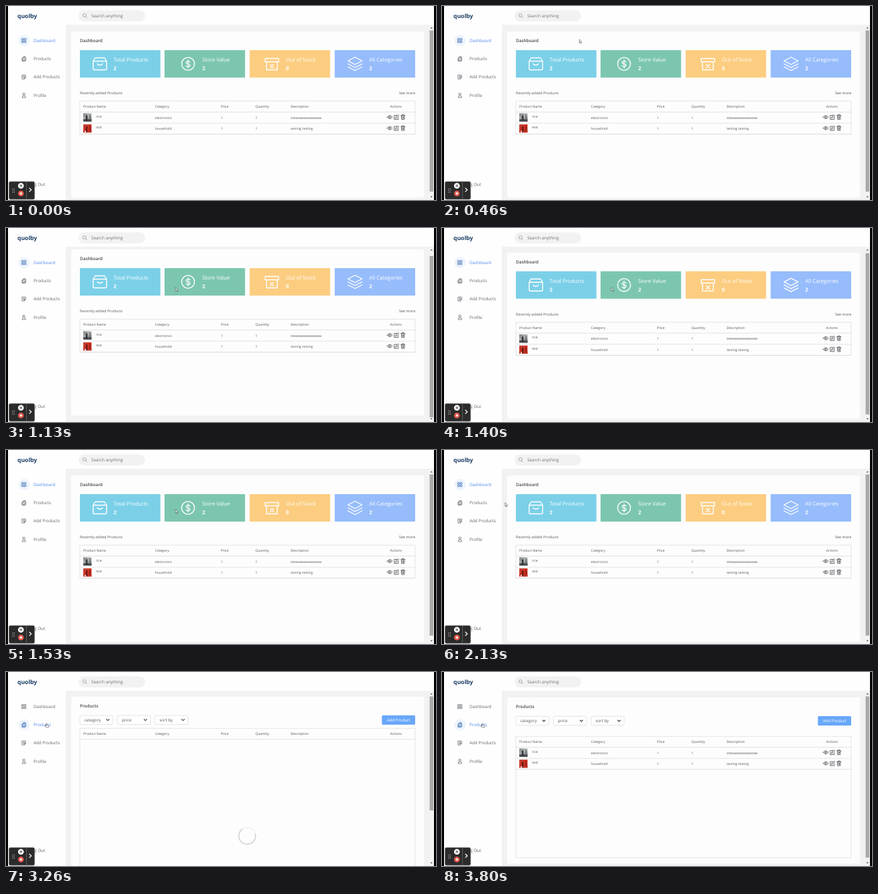
Recreate the animation shown at these times as an HTML page with a canvas. Size 640 px wide and 290 px high, loop 3.86 s.

```html
<!DOCTYPE html>
<html lang="en">
<head>
<meta charset="utf-8">
<title>Inventory dashboard</title>
<style>
  html, body { margin: 0; width: 100%; height: 100%; overflow: hidden; background: #000; }
  canvas { display: block; width: 640px; height: 290px; }
</style>
</head>
<body>
<canvas id="stage"></canvas>
<script>
const W = 640, H = 290, LOOP = 3860, STEP = 200 / 3;
const PAGE_SWITCH = 2730, LOADED = 3460;
const FONT = '"Open Sans", "Noto Sans", sans-serif';
const INK = '#555a60', BLUE = '#4c86ee', LINE = '#dcdddf';

const canvas = document.getElementById('stage');
const ctx = canvas.getContext('2d');
const dpr = window.devicePixelRatio || 1;
canvas.width = W * dpr;
canvas.height = H * dpr;

const clamp = v => Math.max(0, Math.min(1, v));
const ease = v => v * v * (3 - 2 * v);

// Interpolates [time, ...values] keys with eased segments.
function track(keys, t) {
  if (t <= keys[0][0]) return keys[0].slice(1);
  for (let i = 1; i < keys.length; i++) {
    const a = keys[i - 1], b = keys[i];
    if (t <= b[0]) {
      const p = ease(clamp((t - a[0]) / (b[0] - a[0])));
      return a.slice(1).map((v, j) => v + (b[j + 1] - v) * p);
    }
  }
  return keys[keys.length - 1].slice(1);
}

function text(str, x, y, size, color = INK, weight = 400) {
  ctx.font = `${weight} ${size}px ${FONT}`;
  ctx.textRendering = 'geometricPrecision';
  ctx.textBaseline = 'alphabetic';
  ctx.fillStyle = color;
  ctx.fillText(str, x, y + size * 0.33);
}

function rect(x, y, w, h, color) {
  ctx.fillStyle = color;
  ctx.fillRect(x, y, w, h);
}

function round(x, y, w, h, r, fill, stroke, lw = 1) {
  ctx.beginPath();
  ctx.roundRect(x, y, w, h, r);
  paint(fill, stroke, lw);
}

function circle(x, y, r, fill, stroke, lw = 1) {
  ctx.beginPath();
  ctx.arc(x, y, r, 0, Math.PI * 2);
  paint(fill, stroke, lw);
}

function paint(fill, stroke, lw) {
  if (fill) { ctx.fillStyle = fill; ctx.fill(); }
  if (stroke) { ctx.strokeStyle = stroke; ctx.lineWidth = lw; ctx.stroke(); }
}

function shape(x, y, d, fill, stroke, lw = 1) {
  ctx.save();
  ctx.translate(x, y);
  const path = new Path2D(d);
  ctx.lineCap = ctx.lineJoin = 'round';
  if (fill) { ctx.fillStyle = fill; ctx.fill(path); }
  if (stroke) { ctx.strokeStyle = stroke; ctx.lineWidth = lw; ctx.stroke(path); }
  ctx.restore();
}

const ICONS = {
  archive: 'M-7-9H7L10-4V7Q10 9 8 9H-8Q-10 9-10 7V-4ZM-10-4H10M-4 0Q0 4 4 0',
  soldOut: 'M-10-8H10V-3H-10ZM-8-3V9H8V-3M-2.5 1L2.5 6M2.5 1L-2.5 6',
  layers: 'M0-10L10.5-4.5 0 1-10.5-4.5ZM-10.5 0L0 5.5 10.5 0M-10.5 4.5L0 10 10.5 4.5',
  grid: 'M-3-3H-.7V-.7H-3ZM.7-3H3V-.7H.7ZM-3 .7H-.7V3H-3ZM.7 .7H3V3H.7Z',
  stack: 'M-1.5-2H2.8V3H-1.5ZM-1.5-1H-2.8V3.4H1.5M-.5-2V-3.3H1.8V-2M0 0H1.6M0 1.4H1.6',
  note: 'M-2.5-3H2.5V.5L.5 3H-2.5ZM-1.2-1.2H1.2M-1.2 .4H.6M.5 3V.6H2.5',
  user: 'M-1.6-1.6A1.6 1.6 0 1 1 1.6-1.6A1.6 1.6 0 1 1-1.6-1.6ZM-2.6 3.2Q-2.6 .6 0 .6T2.6 3.2Z',
  eye: 'M-3.8 0Q0-5 3.8 0Q0 5-3.8 0ZM-1.2 0A1.2 1.2 0 1 1 1.2 0A1.2 1.2 0 1 1-1.2 0Z',
  edit: 'M.6-2.6H-3.2V3.4H2.8V0M-1.2 1.4L-.8-.4 2.6-3.6 3.7-2.5 .4 .8Z',
  trash: 'M-3-2.4H3M-1.2-2.4V-3.6H1.2V-2.4M-2.4-2.4L-2 3.5H2L2.4-2.4M-.7-.8V2M.7-.8V2',
  chevron: 'M-2-1L0 1 2-1',
  arrow: 'M0 0V5L1.2 4 2 5.8 2.9 5.4 2.1 3.6H3.6Z',
  hand: 'M.2 0Q1.1-.5 1.3.5V2.4L3.6 2.9Q4.3 3.1 4.1 4L3.6 6H.6L-1.2 3.8Q-1-.0.2 3.6Z'
};

function header() {
  rect(3, 0, 634, 28, '#fefefe');
  text('quolby', 17, 14.8, 8.6, '#1d3f66', 700);
  round(108, 6.5, 99, 16.5, 8, '#f2f2f3');
  circle(116.8, 14, 2.4, null, '#8b8f94', 0.7);
  shape(118.6, 15.8, 'M0 0L1.8 1.8', null, '#8b8f94', 0.7);
  text('Search anything', 127, 15, 6.3, '#6c7075');
}

const MENU = [['Dashboard', 'grid'], ['Products', 'stack'], ['Add Products', 'note'], ['Profile', 'user']];

function sidebar(active) {
  rect(3, 28, 86, 262, '#fefefe');
  MENU.forEach(([label, icon], i) => {
    const y = 52 + i * 27.2, on = i === active;
    if (on) circle(27, y - 0.2, 8.5, '#edf4fd');
    shape(26.7, y - 0.3, ICONS[icon], null, on ? '#3f6fb4' : '#666b71', 0.8);
    text(label, 41, y, 6.3, on ? BLUE : '#5d6268');
  });
  text('Log Out', 35, 266.5, 6.3, '#5d6268');
}

function scrollbar(top, bottom) {
  rect(630, 28, 7, 262, '#f3f3f3');
  rect(630.5, top, 5.5, bottom - top, '#a9a9a9');
  shape(633.2, 32.5, 'M-1.8 1L0-1 1.8 1Z', '#555');
  shape(633.2, 285.5, 'M-1.8-1L0 1 1.8-1Z', '#555');
}

function dollar(x, y) {
  circle(x, y, 9.6, null, '#fff', 1.4);
  shape(x, y, 'M3-2.8Q2.4-4.2 0-4.2T-2.9-2.1Q-2.9-.4 0 0T2.9 2.1Q2.9 4.2 0 4.2T-3 2.8M0-6V6', null, '#fff', 1.2);
}

const CARDS = [
  ['Total Products', '2', '#7bd0e8', 'archive', 110, 139.7, 160],
  ['Store Value', '2', '#7cc6b0', null, 236, 271, 292],
  ['Out of Stock', '0', '#fccd80', 'soldOut', 362.6, 395.7, 416.6],
  ['All Categories', '2', '#96bcfb', 'layers', 489.2, 519.5, 540.5]
];

function card([label, count, color, icon, x, ix, tx]) {
  rect(x, 66, 119.8, 41, color);
  if (icon) shape(ix, 86.5, ICONS[icon], null, '#fff', 1.4);
  else dollar(ix, 86.5);
  text(label, tx, 80.8, 7.8, '#fff');
  text(count, tx, 93.3, 7.8, '#fff', 700);
}

function photo(x, y, red) {
  ctx.save();
  ctx.beginPath();
  ctx.rect(x, y, 12.3, 12.5);
  ctx.clip();
  const g = ctx.createLinearGradient(x, y, x + 12, y + 12);
  g.addColorStop(0, red ? '#b5483c' : '#777b7d');
  g.addColorStop(0.5, red ? '#d8301f' : '#b9bcbd');
  g.addColorStop(1, red ? '#a92a20' : '#55595b');
  rect(x, y, 13, 13, g);
  const dark = red ? '#6f1f1a' : '#34383a';
  rect(x, y + 9, 13, 4, red ? '#c53428' : '#4a4e50');
  circle(x + 5, y + 4.5, 1.5, dark);
  rect(x + 3.6, y + 5.6, 2.8, 6, dark);
  rect(x + 9, y + 2, 1.5, 8, red ? '#8a2119' : '#6d7173');
  if (red) rect(x + 2, y + 10, 2, 3, '#f1ddd6');
  ctx.restore();
}

const COLUMNS = [['Product Name', 115], ['Category', 221.7], ['Price', 319.7], ['Quantity', 371.3], ['Description', 423.6], ['Actions', 571.8]];
const ROWS = [['rice', 'electronics', '1', '1', 'stewwwwwwwwww'], ['test', 'household', '1', '1', 'testing testing']];

function tableHead(y) {
  COLUMNS.forEach(([label, x]) => text(label, x, y, 5.05, '#4e5257'));
}

function tableRows(top) {
  ROWS.forEach((row, i) => {
    const y = top + 16.5 + i * 16.5;
    photo(115, y + 1.7, i === 1);
    text(row[0], 134, y + 6.5, 5.1);
    for (let c = 1; c < 5; c++) text(row[c], COLUMNS[c][1], y + 8.6, 5.05);
    ['eye', 'edit', 'trash'].forEach((name, k) =>
      shape(571.2 + k * 9.8, y + 7.6, ICONS[name], null, '#474b50', 0.8));
    rect(110, y + 16.2, 499, 0.8, LINE);
  });
}

function table(top, height, filled) {
  round(109.9, top + 0.2, 499, height, 0, null, LINE, 0.8);
  tableHead(top + 8.5);
  rect(110, top + 16, 499, 0.8, LINE);
  if (filled) tableRows(top);
}

function panel(h) {
  round(97, 38, 525, h, 3, '#fdfdfd');
}

function dashboard() {
  panel(248.5);
  text('Dashboard', 110, 52.2, 6.4, '#3f4348', 600);
  CARDS.forEach(card);
  text('Recently added Products', 110, 130.5, 5.5);
  text('See more', 585, 130.5, 5.5);
  table(142, 49.5, true);
}

function spinner(x, y, t) {
  const a = (t - 3260) / 750 * Math.PI * 2 - 2.2;
  circle(x, y, 12.5, null, '#f0f0f0', 1.6);
  ctx.beginPath();
  ctx.arc(x, y, 12.5, a - 4.4, a);
  paint(null, '#d5d6d8', 1.6);
}

function products(t) {
  const loaded = t >= LOADED;
  panel(loaded ? 248.5 : 300);
  text('Products', 110, 52.3, 6.4, '#3f4348', 600);
  ['category', 'price', 'sort by'].forEach((label, i) => {
    const x = 110 + i * 56;
    round(x, 66.3, 49, 13.5, 2, '#fff', LINE, 0.8);
    text(label, x + 6.4, 73.3, 6.2);
    shape(x + 41.5, 73, ICONS.chevron, null, '#3f4348', 1.1);
  });
  round(559.5, 66, 49.5, 14, 1.5, '#68a7fa');
  text('Add Product', 567, 73, 6.05, '#fff');
  if (loaded) table(96, 181.5, true);
  else {
    table(85.3, 260, false);
    spinner(359, 246.3, t);
  }
}

function recorder() {
  round(4.5, 262.5, 38, 26.5, 2, '#2b2b2c', '#707173', 0.7);
  rect(30, 263, 0.8, 25.5, '#66676a');
  for (let i = 0; i < 6; i++) circle(9.9 + (i % 2) * 2.4, 273.4 + (i >> 1) * 2.5, 0.65, '#b5b5b5');
  circle(22.2, 268.7, 4.3, '#fff');
  rect(20.7, 266.9, 1, 3.6, '#333');
  rect(22.7, 266.9, 1, 3.6, '#333');
  circle(22.2, 280.2, 4.3, '#e2574a');
  rect(20.7, 278.7, 3, 3, '#fff');
  shape(36.3, 274.8, 'M-1.4-2.6L1.4 0-1.4 2.6', null, '#fff', 1.2);
}

const POINTER = [[200, 188, 22], [460, 204.3, 50.2], [800, 252.2, 89.3], [1600, 252.2, 89.3], [2330, 59.5, 77]];
const SCROLL = [[860, 0], [1060, 6], [1260, 6], [1460, 0]];

function pointer(t) {
  if (t < 200) return;
  const [x, y] = track(POINTER, t);
  const hand = x < 72;
  shape(x, y, hand ? ICONS.hand : ICONS.arrow, hand ? '#fff' : '#fafafa', '#4a4d52', 0.6);
}

function clickRing(t) {
  if (t < 2520 || t >= PAGE_SWITCH) return;
  const r = 6 + 7.2 * ease(clamp((t - 2520) / 130));
  circle(59.7, 76.6, r, 'rgba(236,120,110,.07)', '#e27a72', 1.4);
}

function draw(t) {
  const onProducts = t >= PAGE_SWITCH, loading = onProducts && t < LOADED;
  const scroll = loading ? 1.3 : track(SCROLL, t)[0];
  ctx.setTransform(dpr, 0, 0, dpr, 0, 0);
  rect(0, 0, W, H, '#000');
  rect(3, 0, 634, H, '#f2f2f3');

  ctx.save();
  ctx.beginPath();
  ctx.rect(89, 28, 541, 262);
  ctx.clip();
  ctx.translate(0, -scroll);
  if (onProducts) products(t);
  else dashboard();
  ctx.restore();

  header();
  sidebar(onProducts ? 1 : 0);
  if (loading) scrollbar(36.5, 207);
  else scrollbar(36.5 + scroll * 0.9, 277.5 + scroll * 0.9);
  clickRing(t);
  pointer(t);
  recorder();
}

const start = performance.now();
function tick() {
  const t = (performance.now() - start) % LOOP;
  draw(Math.floor((t + 7) / STEP) * STEP);
  requestAnimationFrame(tick);
}
tick();
</script>
</body>
</html>
```
